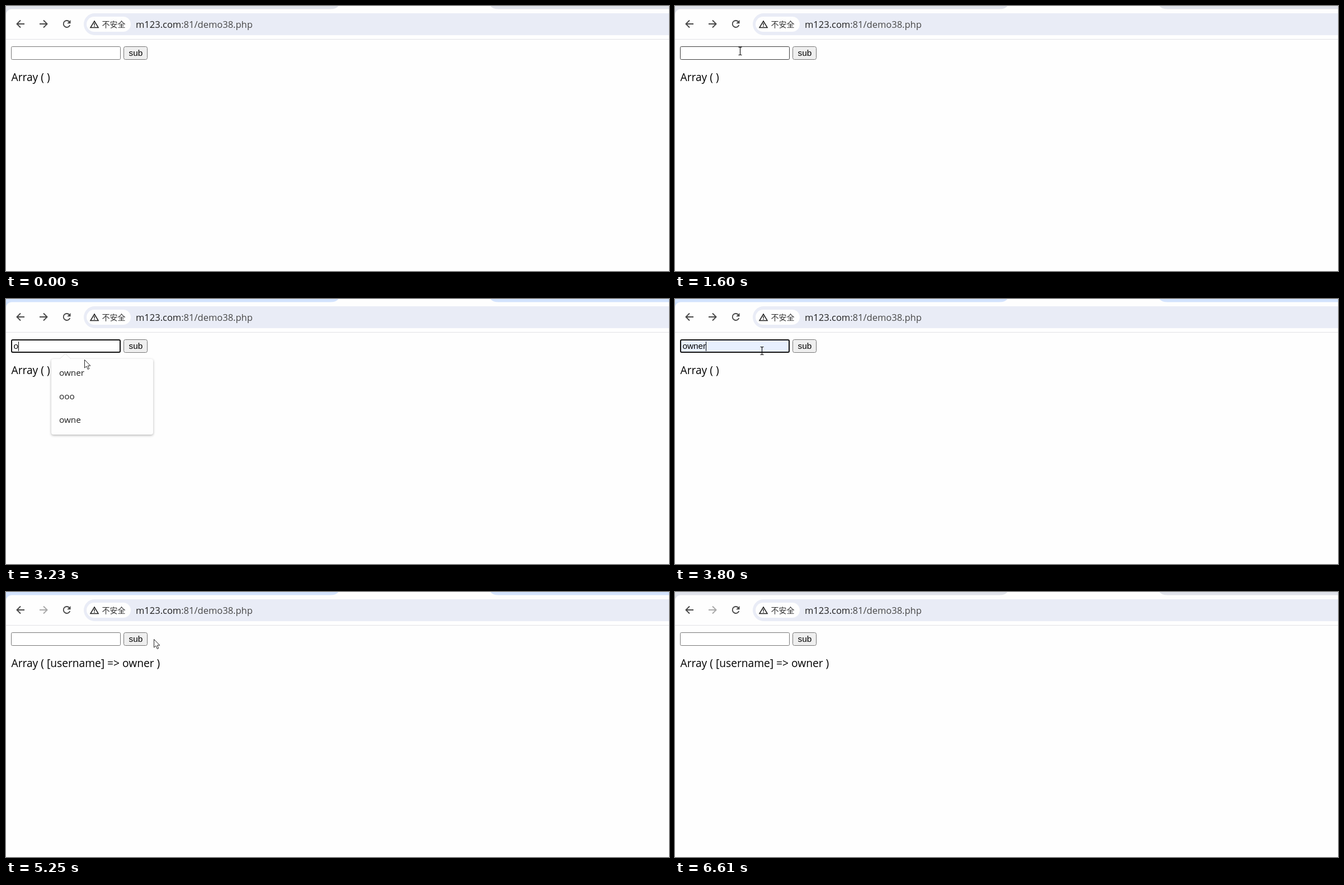
Recreate the animation shown at these times as an HTML page with a canvas. Size 1185 by 473 pixels, loop 6640 ms.

```html
<!DOCTYPE html>
<html lang="zh">
<head>
<meta charset="utf-8">
<title>Form demo</title>
<style>
html, body { margin: 0; width: 100%; height: 100%; overflow: hidden; background: #fefefe; }
canvas { display: block; }
</style>
</head>
<body>
<canvas id="stage" width="1185" height="473"></canvas>
<script>
const g = document.getElementById('stage').getContext('2d');
const LOOP = 6640;
const UI = '"Open Sans", "Noto Sans", sans-serif';
const FORM = '"Liberation Sans", Arial, sans-serif';
const CJK = '"Noto Sans CJK SC", "Noto Sans CJK", sans-serif';
const NAME = 'owner';
const ALL = [NAME, 'btk', 'rvumbhoz', 'btk1', '317846590714', 'wyn7ra5t'];
const MATCHES = [NAME, 'ooo', 'owne'];

// Pointer path: time, x, y
const PATH = [
  [280, 585, 462], [400, 440, 340], [520, 300, 245], [600, 199, 196], [650, 228, 183],
  [1030, 228, 183], [1250, 170, 120], [1420, 125, 86], [1600, 116, 80],
  [1820, 116, 80], [1870, 116, 79], [3150, 116, 79], [3230, 140, 108], [3380, 150, 121],
  [3610, 150, 121], [3800, 155, 92], [4050, 215, 82], [4260, 248, 78],
  [5200, 248, 78], [5250, 264, 84], [5400, 410, 225], [5630, 662, 473]
];

function text(str, x, y, size, font, color = '#000') {
  g.font = `${size}px ${font}`;
  g.fillStyle = color;
  g.fillText(str, x, y);
}

function box(x, y, w, h, r, fill, stroke, width = 1) {
  g.beginPath();
  g.roundRect(x, y, w, h, r);
  if (fill) { g.fillStyle = fill; g.fill(); }
  if (stroke) { g.strokeStyle = stroke; g.lineWidth = width; g.stroke(); }
}

function line(d, color, width) {
  g.strokeStyle = color;
  g.lineWidth = width;
  g.stroke(new Path2D(d));
}

function shape(d, color) {
  g.fillStyle = color;
  g.fill(new Path2D(d));
}

function pointer(t) {
  if (t < PATH[0][0]) return null;
  const i = PATH.findIndex(p => p[0] > t);
  if (i < 0) return null;
  const [t0, x0, y0] = PATH[i - 1], [t1, x1, y1] = PATH[i];
  const k = (t - t0) / (t1 - t0);
  return { x: x0 + (x1 - x0) * k, y: y0 + (y1 - y0) * k };
}

const inside = (p, x, y, w, h) => p && p.x >= x && p.x <= x + w && p.y >= y && p.y <= y + h;

function browserBar(t) {
  g.fillStyle = t >= 1820 && t < 6610 ? '#d3e3fd' : '#dfe2ea';
  g.fillRect(0, 0, 1185, 20);
  box(0, 5.5, 1300, 600, [10, 0, 0, 0], '#fefefe');
  shape('M580 6Q591 5 594 0H866Q869 5 880 6Z', '#fefefe');
  g.fillStyle = '#e1e2e5';
  g.fillRect(0, 59, 1185, 1);

  const dark = '#474747';
  line('M33 32H20M26 25.5L19.5 32L26 38.5', dark, 1.9);
  line('M60 32H73M67 25.5L73.5 32L67 38.5', t >= 4830 ? '#a8a8a8' : dark, 1.9);
  line('M114.3 34A6 6 0 1 1 113 27.8', dark, 1.9);
  shape('M115.5 25V31.3H109.2Z', dark);

  box(139, 13, 1100, 39, 19.5, '#e9ecf6');
  box(144, 19, 79, 27, 13.5, '#fefefe');
  line('M158 27L165 38.6H151ZM158 30.5V34.5M158 35.5V37', '#1f1f1f', 1.5);
  text('不安全', 171.5, 38.2, 14, CJK, '#333');
  const host = 'm123.com';
  text(host, 232, 38.5, 16.5, UI, '#1f1f1f');
  text(':81/demo38.php', 232 + g.measureText(host).width, 38.5, 16.5, UI, '#474747');
}

function form(t, mouse) {
  const focus = t >= 1820 && t < 4460;
  const preview = t >= 3280 && t < 3610;
  const filled = t >= 3610 && t < 4460;
  const hover = inside(mouse, 9, 72, 196, 24);
  const fill = preview || filled ? '#e8f0fe' : '#fff';
  if (focus) box(10, 73, 194, 22, 2, fill, '#101010', 2);
  else box(9.5, 72.5, 195, 23, 2, fill, hover ? '#3c3c3c' : '#767676');

  const value = preview || filled ? NAME : t >= 2900 && t < 3610 ? NAME[0] : '';
  text(value, 13.5, 89, 15.3, FORM);
  const caret = t < 2900 ? t < 2350 : t < 4140;
  if (focus && caret && !preview) {
    g.fillRect(Math.round(13.5 + g.measureText(value).width), 76, 1, 17);
  }

  const over = inside(mouse, 210, 72, 43, 24);
  const pressed = t >= 4460 && t < 4510;
  box(210.5, 72.5, 42, 23, 3, pressed ? '#f5f5f5' : over ? '#e5e5e5' : '#efefef', over ? '#555' : '#767676');
  text('sub', 219.5, 89, 15.3, FORM);

  if (t < 4510) text('Array ( )', 9.5, 134, 19.2, UI);
  else if (t >= 4700) text(`Array ( [username] => ${NAME} )`, 9.5, 134, 19.2, UI);
}

function suggestions(t) {
  if (t < 1820 || t >= 3610) return;
  const rows = t < 2960 ? ALL : MATCHES;
  g.save();
  g.globalAlpha = Math.min(1, (t - 1770) / 150);
  g.shadowColor = 'rgba(0,0,0,.3)';
  g.shadowBlur = 4;
  g.shadowOffsetY = 1.5;
  box(81, 107, 182, 10 + rows.length * 41.67, 4, '#fefefe');
  g.shadowColor = 'transparent';
  shape('M95 108L106 97.5L117 108Z', '#fefefe');
  line('M96 107L106 97.5L116 107', '#e6e6e6', 1);
  rows.forEach((row, i) => text(row, 95, 137.3 + i * 41.67, 15.3, UI, '#1f1f1f'));
  g.restore();
}

function drawPointer(p) {
  if (!p) return;
  g.save();
  g.translate(Math.round(p.x) + .5, Math.round(p.y) + .5);
  if (inside(p, 9, 72, 196, 24)) {
    line('M-3 -7H-1L0 -6L1 -7H3M0 -6V6M-3 7H-1L0 6L1 7H3', '#111', 1.2);
  } else {
    const arrow = 'M0 0V14.5L3.4 11.4L5.8 17L8.2 16L5.8 10.6H10.3Z';
    shape(arrow, '#fff');
    line(arrow, '#222', 1);
  }
  g.restore();
}

function frame(now) {
  const t = now % LOOP;
  const mouse = pointer(t);
  g.fillStyle = '#fefefe';
  g.fillRect(0, 0, 1185, 473);
  browserBar(t);
  form(t, mouse);
  suggestions(t);
  drawPointer(mouse);
}

let start;
function tick(now) {
  start ??= now;
  frame(now - start);
  requestAnimationFrame(tick);
}
requestAnimationFrame(tick);
</script>
</body>
</html>
```
